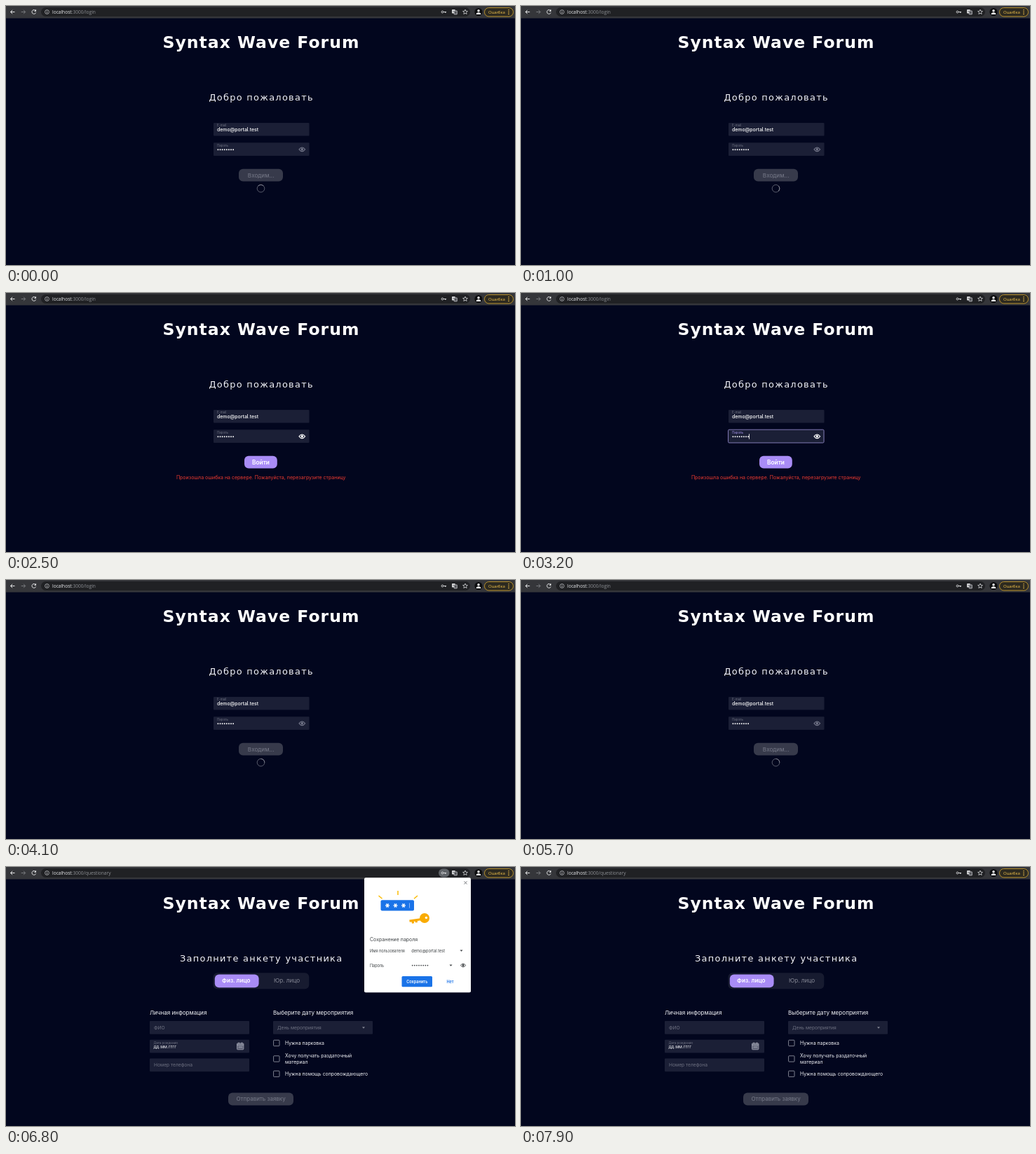
An HTML page that plays this animation: 726x370 px, repeating every 8000 ms.

```html
<!DOCTYPE html>
<html lang="ru">
<head>
<meta charset="utf-8">
<title>Login</title>
<style>
  html, body { margin: 0; width: 726px; height: 370px; overflow: hidden; background: #02061e; }
  svg { display: block; font-family: Inter, "Open Sans", sans-serif; }
  .title { font-family: "DejaVu Sans", sans-serif; font-weight: 700; letter-spacing: 1px; }
  .wide { font-family: "DejaVu Sans", sans-serif; letter-spacing: 1.3px; }
  .ui { font-family: "Open Sans", "Noto Sans", sans-serif; }
</style>
</head>
<body>
<svg id="stage" width="726" height="370" viewBox="0 0 726 370"></svg>
<script>
const LOOP = 8000;
// Moments at which the screen switches, in ms
const AT = { error: 1300, focus: 2700, retry: 3500, form: 5900, popup: 6400, closed: 7600 };
const SPIN = 800, BLINK = 1060;

const TITLE = 'Syntax Wave Forum', EMAIL = 'demo@portal.test';
const PAGE = '#02061e', FIELD = '#1b1f36', MUTED = '#6d7080', OFF = '#373a4b';
const VIOLET = '#a98cf6', BLUE = '#1a73e8', GOLD = '#f9ab00';

const text = (x, y, size, fill, str, attrs = '') =>
  `<text x="${x}" y="${y}" font-size="${size}" fill="${fill}" ${attrs}>${str}</text>`;
const mid = (x, y, size, fill, str, attrs = '') => text(x, y, size, fill, str, `text-anchor="middle" ${attrs}`);
const rect = (x, y, w, h, fill, r = 0, attrs = '') =>
  `<rect x="${x}" y="${y}" width="${w}" height="${h}" rx="${r}" fill="${fill}" ${attrs}/>`;
const circle = (x, y, r, fill, attrs = '') => `<circle cx="${x}" cy="${y}" r="${r}" fill="${fill}" ${attrs}/>`;
const line = (d, color, width = 1, attrs = '') =>
  `<path d="${d}" fill="none" stroke="${color}" stroke-width="${width}" ${attrs}/>`;
const shape = (d, fill) => `<path d="${d}" fill="${fill}"/>`;
const group = (id, ...parts) => `<g id="${id}">${parts.join('')}</g>`;
const dots = (x, y, step, r, fill) =>
  Array.from({ length: 8 }, (_, i) => circle(x + i * step, y, r, fill)).join('');
const arrow = (x, y, fill) => shape(`M${x - 2} ${y - 1}h4l-2 2.2z`, fill);
const eye = (x, y, s, color) => `<g transform="translate(${x} ${y}) scale(${s})">` +
  line('M-4.3 0Q0 -5.6 4.3 0Q0 5.6 -4.3 0Z', color, 1.1) + circle(0, 0, 1.7, color) + '</g>';
const heading = str => mid(364.2, 134.7, 12.9, '#f4f4f8', str, 'class="wide"');
const bold = 'font-weight="600"', medium = 'font-weight="500"';

function star(x, y, r) {
  const pts = Array.from({ length: 10 }, (_, i) => {
    const a = -Math.PI / 2 + i * Math.PI / 5, q = i % 2 ? r * .45 : r;
    return `${x + q * Math.cos(a)},${y + q * Math.sin(a)}`;
  });
  return `<polygon points="${pts.join(' ')}" fill="none" stroke="#d5d6d8" stroke-width=".8"/>`;
}

const asterisk = (x, y) => [0, 60, 120].map(a =>
  line(`M${x - 3} ${y}h6`, '#fff', 1.3, `transform="rotate(${a} ${x} ${y})"`)).join('');

function browserBar() {
  const address = path => text(66, 11, 6.6, '#e8eaed', `localhost<tspan fill="#8d9095">:3000/${path}</tspan>`, 'class="ui"');
  return rect(0, 0, 726, 17.5, '#35363a') + rect(50, 2, 612, 13, '#202124', 6.5) +
    line('M12.5 8.5H6.7M9.2 5.8L6.5 8.5L9.2 11.2', '#e4e5e7', 1) +
    line('M21.7 8.5H27.5M25 5.8L27.7 8.5L25 11.2', '#77797d', 1) +
    line('M42.3 6.8A2.9 2.9 0 1 0 42.6 9.5', '#e4e5e7', 1) + shape('M43 4.8v3h-3z', '#e4e5e7') +
    circle(58.5, 8.5, 2.9, 'none', 'stroke="#c4c6c9" stroke-width=".8"') +
    line('M58.5 8v2.2M58.5 6.7v.7', '#c4c6c9', .8) +
    group('urlLogin', address('login')) + group('urlForm', address('questionary')) +
    group('keyPill', rect(617, 2.5, 15.5, 12, '#5f6368', 6)) +
    circle(622.5, 8.5, 1.4, 'none', 'stroke="#d5d6d8" stroke-width="1"') +
    line('M624 8.5h4M626.8 8.5v1.6', '#d5d6d8', 1.1) +
    rect(636, 5, 4.6, 5.4, '#d5d6d8', .6) + rect(639, 6.8, 4.4, 5.2, '#696b70', .6, 'stroke="#d5d6d8" stroke-width=".6"') +
    line('M637.2 7.7h2.2M640.3 9h2M641.3 9v1.6', '#303134', .6) +
    star(655, 8.6, 3.6) +
    circle(674, 8.5, 5.6, '#0c0d0f') + circle(674, 6.8, 1.7, '#fff') + shape('M670.7 12Q670.7 9.3 674 9.3T677.3 12Z', '#fff') +
    rect(682.5, 2.5, 41, 12.5, '#2d2a20', 6.2, 'stroke="#c79b2c" stroke-width=".9"') +
    text(688, 11, 6, '#f3c34a', 'Ошибка', 'class="ui"') +
    [5.8, 8.6, 11.4].map(y => circle(717, y, .8, '#f3c34a')).join('');
}

function loginPage() {
  return heading('Добро пожаловать') +
    rect(296, 167, 136.5, 18.5, FIELD, 1) + text(301, 172.3, 4.4, MUTED, 'E-mail') +
    text(301, 178.7, 6.9, '#fff', EMAIL, medium) +
    rect(296, 195.3, 136.5, 18.7, FIELD, 1) +
    group('labelIdle', text(301, 200.8, 4.4, MUTED, 'Пароль')) +
    group('focusRing',
      rect(295.5, 195.2, 136.5, 18.8, 'none', 1.5, 'stroke="#8f86c4" stroke-width=".9"'),
      text(301, 200.8, 4.4, '#a796ee', 'Пароль')) +
    group('caret', rect(325, 201.3, .8, 7.4, '#fff')) +
    dots(302.4, 205.2, 3.1, .95, '#fff') +
    group('loading',
      eye(422.3, 204.8, 1, '#74778a'),
      rect(332, 232.8, 63, 17.8, OFF, 6),
      mid(363.7, 244.6, 8.2, '#777a89', 'Входим...'),
      circle(363.5, 260.7, 5.3, 'none', 'stroke="#5c5f6e" stroke-width="1"'),
      line('M359.75 256.95A5.3 5.3 0 0 1 367.25 256.95', '#80838f', 1, 'id="spinner"')) +
    group('ready',
      eye(422.3, 204.8, 1, '#fff'),
      rect(340, 232.8, 46.8, 17.8, VIOLET, 6),
      mid(363.5, 244.6, 8.3, '#fff', 'Войти', bold),
      mid(363.7, 265.7, 7, '#ee3a30', 'Произошла ошибка на сервере. Пожалуйста, перезагрузите страницу'));
}

function formPage() {
  const check = y => rect(381.6, y - 4.2, 8.4, 8.4, 'none', .8, 'stroke="#8d8f9c" stroke-width=".9"');
  const note = (y, str) => text(398, y, 6.9, '#f2f2f6', str);
  const hint = (x, y, str) => text(x, y, 6.7, MUTED, str);
  return heading('Заполните анкету участника') +
    rect(295.5, 151.3, 136.8, 23, '#171b30', 6) + rect(297.8, 153.4, 62.8, 18.8, VIOLET, 6) +
    mid(328.3, 165.2, 8.2, '#fff', 'Физ. лицо', bold) + mid(400.5, 165.2, 8.2, '#858795', 'Юр. лицо') +
    text(205, 210.6, 8.1, '#f2f2f6', 'Личная информация') +
    text(381, 210.6, 8.1, '#f2f2f6', 'Выберите дату мероприятия') +
    [220, 246.8, 273.4].map(y => rect(205, y, 142, 18.8, FIELD, 1)).join('') +
    hint(211, 232, 'ФИО') +
    text(210.5, 252.6, 4.5, MUTED, 'Дата рождения') +
    text(210.5, 258.6, 6.3, '#f2f2f6', 'дд.мм.гггг') +
    rect(329.5, 251.8, 9.4, 9, '#62667a', 1, 'stroke="#9a9cab" stroke-width=".9"') +
    line('M329.5 254.2h9.4M332 250.5v2M336.5 250.5v2M331.5 257.2h5.6', '#b2b4c0', .9) +
    hint(211, 285.3, 'Номер телефона') +
    rect(381, 220, 142, 18.8, FIELD, 1) + hint(387, 232, 'День мероприятия') + arrow(510, 229.5, '#8d8f9c') +
    check(251.5) + check(274) + check(295.5) +
    note(254, 'Нужна парковка') + note(272.4, 'Хочу получать раздаточный') + note(281.2, 'материал') +
    note(298, 'Нужна помощь сопровождающего') +
    rect(317, 322.6, 93, 18, OFF, 6) + mid(363.6, 334.4, 8, '#777a89', 'Отправить заявку');
}

function savePopup() {
  const label = (y, str) => text(519, y, 5.5, '#3c4043', str);
  return rect(511, 15.3, 152, 164, '#fff', 2) +
    line('M653.5 20.5l4 4M657.5 20.5l-4 4', '#5f6368', .9) +
    line('M559 34v6M531.5 41l5 4.2M587 41l-5 4.2', '#fbbc04', 1.5) +
    rect(534.5, 47.2, 47.5, 15.4, BLUE, 2) +
    [544, 555.5, 567].map(x => asterisk(x, 55)).join('') + line('M575.5 51.5v7', '#8ab4f8', 1) +
    line('M593 74.5L575.5 77.2M580 76.5l.6 4M585 75.7l.5 3.6', GOLD, 3.2) +
    circle(597, 73, 7, GOLD) + circle(599.4, 72.4, 1.7, '#fff') +
    text(519, 106, 7, '#3c4043', 'Сохранение пароля') +
    label(121.6, 'Имя пользователя') + text(578.3, 121.6, 5.7, '#3c4043', EMAIL) + arrow(649.5, 119.5, '#3c4043') +
    label(142.5, 'Пароль') + dots(579.7, 140.6, 3.1, .9, '#3c4043') + arrow(634.5, 140.5, '#3c4043') +
    eye(652, 140.5, .85, '#3c4043') +
    rect(564.5, 156, 43.5, 15.3, BLUE, 1.5) + mid(586.3, 165.6, 5.6, '#fff', 'Сохранить', bold) +
    mid(633.5, 165.6, 5.6, BLUE, 'Нет', bold);
}

const stage = document.getElementById('stage');
stage.innerHTML = rect(0, 0, 726, 370, PAGE) + browserBar() +
  mid(364, 59.5, 23.5, '#fff', TITLE, 'class="title"') +
  group('login', loginPage()) + group('form', formPage()) + group('popup', savePopup());

const byId = Object.fromEntries([...stage.querySelectorAll('[id]')].map(el => [el.id, el]));
const show = (on, ...ids) => ids.forEach(id => { byId[id].style.display = on ? '' : 'none'; });

function draw(now) {
  const t = now % LOOP;
  const within = (from, to) => t >= from && t < to;
  const form = t >= AT.form, ready = within(AT.error, AT.retry);
  const focus = within(AT.focus, AT.retry), popup = within(AT.popup, AT.closed);
  show(!form, 'login', 'urlLogin');
  show(form, 'form', 'urlForm');
  show(ready, 'ready');
  show(!ready, 'loading');
  show(focus, 'focusRing');
  show(!focus, 'labelIdle');
  show(focus && (t - AT.focus) % BLINK < BLINK / 2, 'caret');
  show(popup, 'popup', 'keyPill');
  byId.spinner.setAttribute('transform', `rotate(${t / SPIN * 360} 363.5 260.7)`);
}

const start = performance.now();
function tick() {
  draw(performance.now() - start);
  requestAnimationFrame(tick);
}
tick();
</script>
</body>
</html>
```
